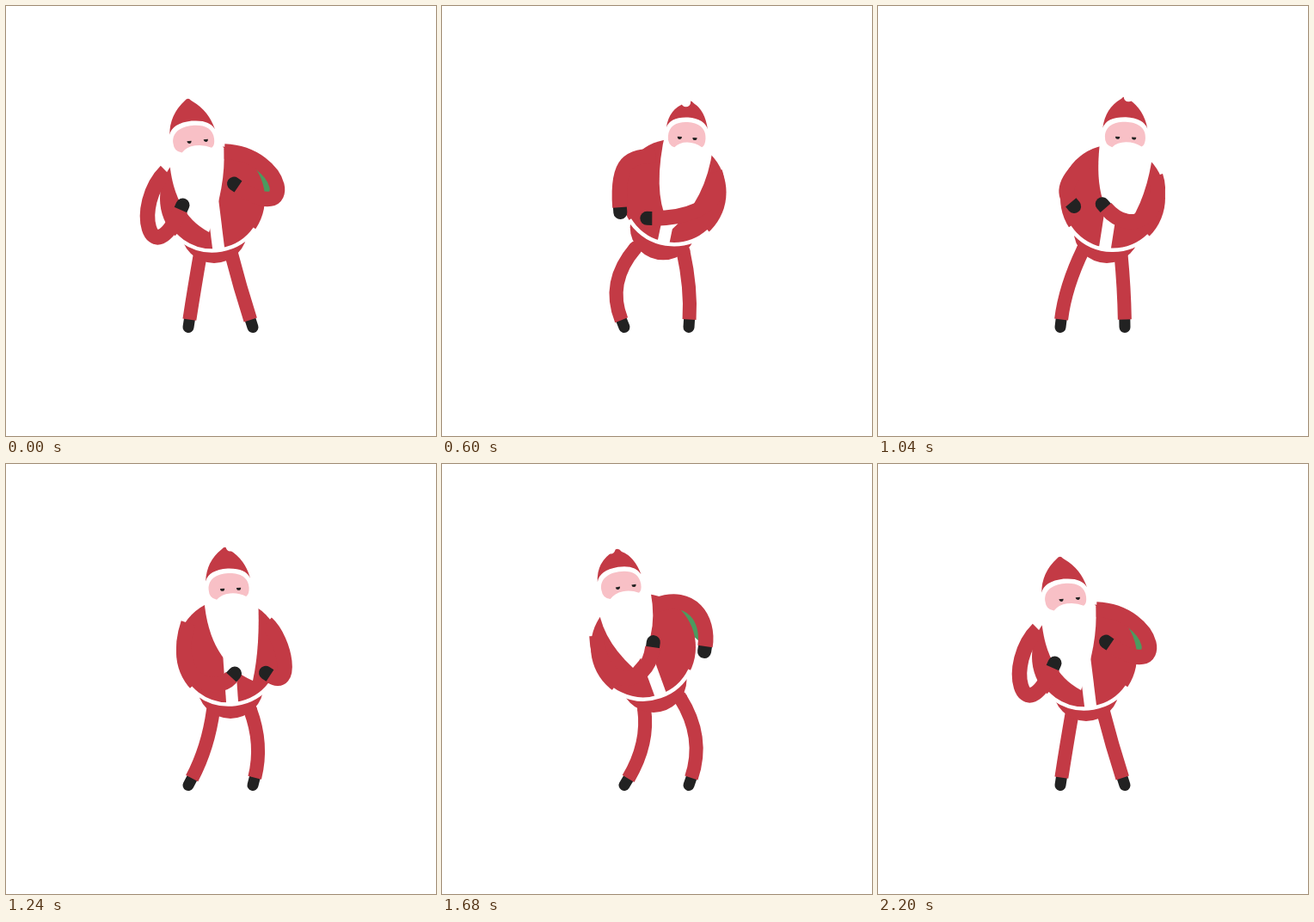
Animation, 500 px wide and 500 px high, one loop 2.24 s. Source, as an HTML page with a canvas:

```html
<!DOCTYPE html>
<html lang="en">
<head>
<meta charset="utf-8">
<title>Dancing Santa</title>
<style>
  html, body { margin: 0; width: 100%; height: 100%; overflow: hidden; background: #fff; }
  canvas { display: block; width: 500px; height: 500px; }
</style>
</head>
<body>
<canvas id="stage" width="500" height="500"></canvas>
<script>
const ctx = document.getElementById('stage').getContext('2d');
const RED = '#c33a45', PINK = '#f8c0c6', BLACK = '#222222', WHITE = '#ffffff', GREEN = '#4c9a5f';
const LOOP = 2240, CYCLE = 2200, STEP = 40;
const TIMES = [0, 400, 840, 1240, 1680, 2000];
const FEET = [[212, 373.5], [287, 373.5]];

// Smooth cyclic curve through one row of values per key time.
function track(rows) {
  const n = rows.length;
  const wrap = i => rows[(i + n) % n];
  const time = i => TIMES[(i + n) % n] + Math.floor(i / n) * CYCLE;
  return t => {
    let i = n - 1;
    while (TIMES[i] > t) i--;
    const h = time(i + 1) - time(i), u = (t - time(i)) / h;
    const slope = (k, j) => (wrap(k + 1)[j] - wrap(k - 1)[j]) / (time(k + 1) - time(k - 1)) * h;
    return wrap(i).map((a, j) => {
      const b = wrap(i + 1)[j], m = slope(i, j), k = slope(i + 1, j);
      return a + u * (m + u * (3 * (b - a) - 2 * m - k + u * (2 * (a - b) + m + k)));
    });
  };
}

// belly x, y, tilt in degrees, pelvis x, y
const torso = track([
  [240, 224, -7, 242, 261],
  [256, 211, 3, 248, 254],
  [281, 225, 18, 267, 262],
  [259, 219, -4, 261, 258],
  [234, 213, -20, 246, 251],
  [220, 211, -27, 243, 251]
]);
// face x, y, tilt, scale, eye shift, hat tip x, y, pompon x, y
const head = track([
  [218, 155, -6, 1, 4.5, -6, -48, 0, -50],
  [259, 146, 0, .88, 1.5, 2, -41, -4, -39],
  [304.5, 157, 6, .97, 0, 3, -44, 3, -42],
  [259, 143, -3, .98, 2, -4, -47, 2, -47],
  [208, 141, -9, .97, 5.5, -4, -43, -12, -42],
  [184, 152, -12, .93, 8, -3, -41, -9, -37]
]);
// left bend, tip, right bend
const beard = track([
  [192, 240, 236, 263, 256, 210],
  [231, 215, 256, 258, 288, 215],
  [254, 243, 279, 262, 322, 235],
  [236, 230, 287, 252, 296, 210],
  [182, 200, 222, 237, 253, 205],
  [168, 222, 242, 226, 230, 182]
]);
// shoulder, two bends, wrist
const leftArm = track([
  [186, 192, 146, 232, 168, 314, 203, 237],
  [222, 175, 195, 200, 212, 210, 226, 255],
  [268, 176, 235, 162, 191, 170, 189, 210],
  [212, 185, 190, 250, 242, 270, 262, 248],
  [180, 200, 182, 262, 238, 265, 245, 213],
  [168, 205, 195, 242, 262, 240, 310, 214]
]);
const rightArm = track([
  [254, 169, 325, 172, 340, 258, 270, 210],
  [297, 180, 325, 215, 295, 233, 267, 261],
  [332, 205, 340, 255, 262, 268, 227, 224],
  [303, 185, 325, 205, 335, 264, 307, 246],
  [250, 164, 290, 149, 311, 180, 306, 212],
  [232, 170, 270, 168, 284, 204, 291, 231]
]);
// hip and knee, left then right
const legs = track([
  [226, 288, 219, 328, 262, 288, 272, 327],
  [219, 284, 191, 322, 279, 283, 299, 326],
  [234, 280, 200, 322, 280, 288, 277, 330],
  [241, 286, 235, 330, 284, 286, 299, 326],
  [235, 284, 241, 325, 277, 272, 306, 318],
  [235, 286, 246, 325, 281, 266, 321, 315]
]);

const bump = (t, a, b) => t > a && t < b ? Math.sin(Math.PI * (t - a) / (b - a)) ** 2 : 0;
const rad = deg => deg * Math.PI / 180;

function disc(x, y, rx, ry, color) {
  ctx.fillStyle = color;
  ctx.beginPath();
  ctx.ellipse(x, y, rx, ry, 0, 0, 7);
  ctx.fill();
}

function stroke(color, width, cap, draw) {
  ctx.strokeStyle = color;
  ctx.lineWidth = width;
  ctx.lineCap = cap;
  ctx.beginPath();
  draw();
  ctx.stroke();
}

function shape(color, d) {
  ctx.fillStyle = color;
  ctx.fill(new Path2D(d));
}

function leg(hx, hy, kx, ky, [fx, fy]) {
  const d = Math.hypot(kx - fx, ky - fy) / 9;
  const ax = fx + (kx - fx) / d, ay = fy + (ky - fy) / d;
  stroke(BLACK, 13, 'round', () => { ctx.moveTo(ax, ay); ctx.lineTo(fx, fy); });
  disc(hx, hy, 8, 8, RED);
  stroke(RED, 16, 'butt', () => { ctx.moveTo(hx, hy); ctx.quadraticCurveTo(kx, ky, ax, ay); });
}

function armPath([sx, sy, ...bends]) {
  ctx.moveTo(sx, sy);
  ctx.bezierCurveTo(...bends);
}

function arm(a) {
  const [cx, cy, wx, wy] = a.slice(4);
  const d = Math.hypot(wx - cx, wy - cy) / 6;
  stroke(BLACK, 16, 'round', () => {
    ctx.moveTo(wx, wy);
    ctx.lineTo(wx + (wx - cx) / d, wy + (wy - cy) / d);
  });
  stroke(RED, 17.5, 'butt', () => armPath(a));
}

function drawBelly(x, y, tilt) {
  disc(x, y, 61, 62, RED);
  const mid = rad(90 + tilt * .7), half = rad(50);
  stroke(WHITE, 4.5, 'butt', () => ctx.arc(x, y, 60.5, mid - half, mid + half));
  ctx.save();
  ctx.translate(x, y);
  ctx.rotate(rad(tilt));
  ctx.fillStyle = WHITE;
  ctx.fillRect(-7, 0, 14, 60);
  ctx.restore();
}

function drawBeard(b, [x, y, tilt, size]) {
  const c = Math.cos(rad(tilt)) * size, s = Math.sin(rad(tilt)) * size;
  const at = (u, v) => [x + u * c - v * s, y + u * s + v * c];
  const [lx, ly, tx, ty, rx, ry] = b;
  ctx.fillStyle = WHITE;
  ctx.beginPath();
  ctx.moveTo(...at(-30, 13));
  ctx.quadraticCurveTo(lx, ly, tx, ty);
  ctx.quadraticCurveTo(rx, ry, ...at(34, 14));
  ctx.lineTo(...at(28, 0));
  ctx.lineTo(...at(-28, 0));
  ctx.fill();
}

function drawHead([x, y, tilt, size, look, ax, ay, px, py]) {
  ctx.save();
  ctx.translate(x, y);
  ctx.save();
  ctx.rotate(rad(tilt));
  ctx.scale(size, 1);
  disc(0, 1, 29, 24, WHITE);
  ctx.restore();

  // The hat tip swings free of the head's tilt.
  const c = Math.cos(rad(tilt)), s = Math.sin(rad(tilt));
  const at = (u, v) => `${u * size * c - v * s} ${u * size * s + v * c}`;
  shape(RED, `M${at(-27, -8)} Q${at(-25, -31)} ${ax - 4} ${ay + 3} Q${ax} ${ay - 2} ${ax + 5} ${ay + 4}
    Q${at(21, -31)} ${at(26, -9)} Q${at(21, -21)} ${at(0, -21.5)} Q${at(-23, -21)} ${at(-27, -8)}Z`);
  disc(px, py, 5.5, 5.5, WHITE);

  ctx.rotate(rad(tilt));
  ctx.save();
  ctx.scale(size, 1);
  shape(PINK, 'M-24 2C-24-11-13-16 0-16S24-11 24 2Q24 10 20 12Q11 7 1 7.5Q-9 8-15 14Q-24 12-24 2Z');
  ctx.restore();
  for (const side of [-1, 1]) {
    ctx.fillStyle = BLACK;
    ctx.beginPath();
    ctx.ellipse(look + side * 9.7 * size, 1.4, 2.6, 3, 0, 0, Math.PI);
    ctx.fill();
  }
  ctx.restore();
}

function draw(t) {
  ctx.fillStyle = WHITE;
  ctx.fillRect(0, 0, 500, 500);
  const [bx, by, tilt, px, py] = torso(t);
  const h = head(t), l = legs(t), right = rightArm(t);
  leg(...l.slice(0, 4), FEET[0]);
  leg(...l.slice(4), FEET[1]);

  ctx.save();
  ctx.translate(0, -5 * (bump(t, 0, 400) + bump(t, 1240, 1680)));
  disc(px, py, 38.5, 38, RED);
  // Lining that shows between the sleeve and the coat
  ctx.fillStyle = GREEN;
  ctx.beginPath();
  armPath(right);
  ctx.fill();
  drawBelly(bx, by, tilt);
  drawBeard(beard(t), h);
  drawHead(h);
  arm(right);
  arm(leftArm(t));
  ctx.restore();
}

const start = performance.now();
function tick() {
  const t = (performance.now() - start) % LOOP;
  draw(Math.floor(t / STEP) * STEP % CYCLE);
  requestAnimationFrame(tick);
}
tick();
</script>
</body>
</html>
```
